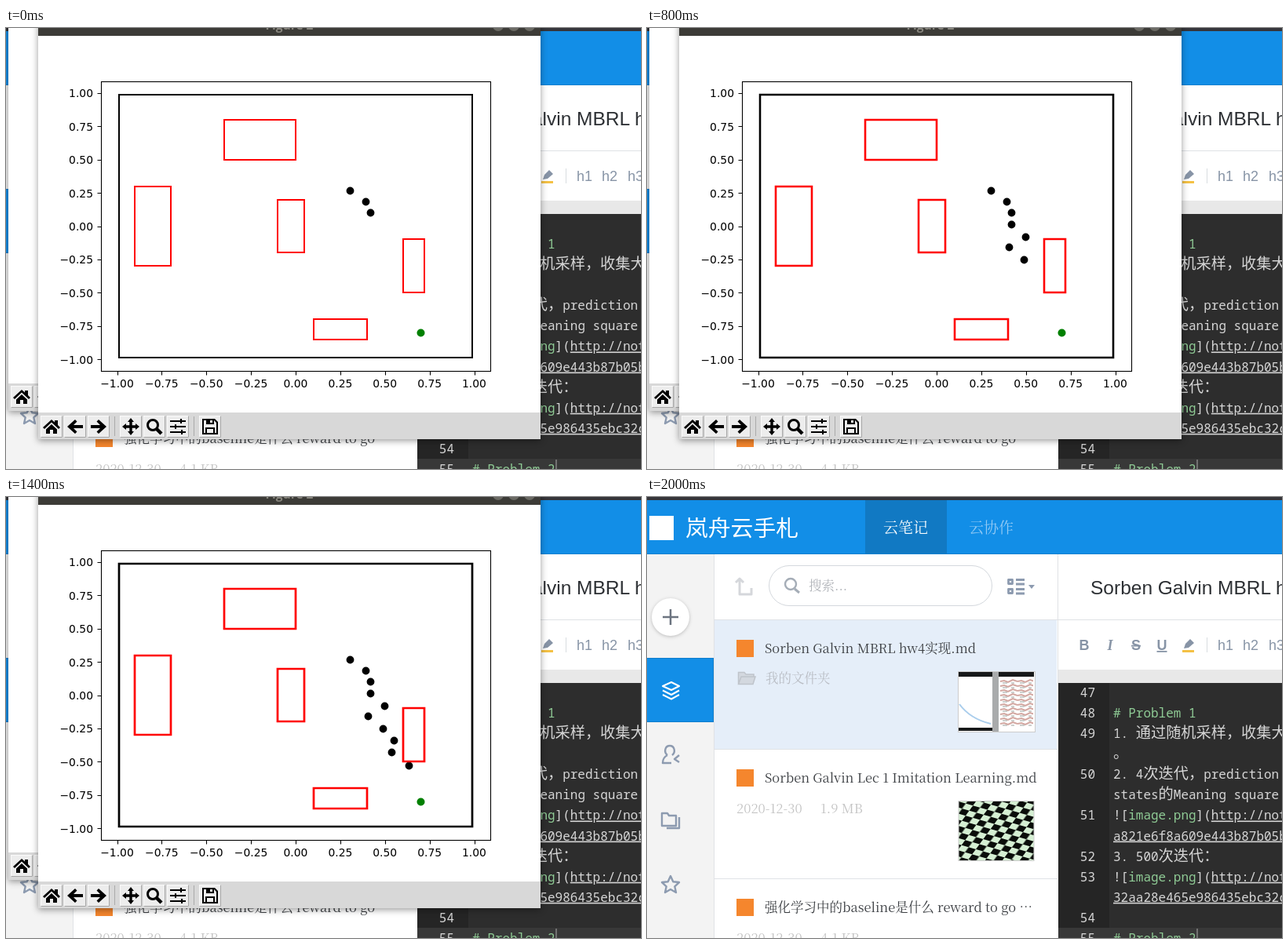
An HTML page that plays this animation: 809 px wide and 562 px high, repeating every 3 s.

```html
<!DOCTYPE html>
<html lang="zh">
<head>
<meta charset="utf-8">
<title>Planner run</title>
<style>
  html, body { margin: 0; width: 100%; height: 100%; overflow: hidden; background: #fff; }
  svg { display: block; }
  .sans { font-family: "Liberation Sans", "Noto Sans CJK SC", sans-serif; }
  .serif { font-family: "Noto Serif CJK SC", "Noto Serif", "Noto Sans CJK SC", serif; font-size: 16.5px; }
  .code { font: 16px "Noto Sans Mono", "Noto Sans CJK SC", monospace; fill: #d6d6d6; }
  .wide { font-size: 19.2px; }
  .head { fill: #8fcb95; }
  .link { text-decoration: underline; }
  .meta { fill: #c4c4c4; }
  .icon { fill: none; stroke: #8d9bb0; stroke-width: 2.4; stroke-linejoin: round; }
  .bar { font: bold 15.5px "Open Sans", sans-serif; fill: #87857d; }
  .plot text { font: 13.89px "DejaVu Sans", sans-serif; }
  .window { filter: drop-shadow(0 2px 4px rgba(0, 0, 0, .4)); }
</style>
</head>
<body>
<svg width="809" height="562" viewBox="0 0 809 562">
  <defs>
    <pattern id="checks" width="19" height="15" patternUnits="userSpaceOnUse" patternTransform="translate(397 388) rotate(16) skewX(-20)">
      <path d="M0 0h19v15H0z" fill="#d5efd3"/>
      <path d="M0 0h9.500v7.500H0zM9.500 7.500H19V15H9.500z" fill="#0a0d0a"/>
    </pattern>
    <pattern id="waves" x="450" y="232" width="22" height="6" patternUnits="userSpaceOnUse">
      <path d="M0 3l5-1 5 2 6-3 6 2" fill="none" stroke="#d3a7a1" stroke-width="2"/>
      <path d="M3 5H9M14 5H18" stroke="#9aa09c"/>
    </pattern>
    <linearGradient id="pane" x2="0" y2="1">
      <stop stop-color="#b4b6b8"/><stop offset="1" stop-color="#d6d6d6"/>
    </linearGradient>
    <path id="home" d="M-11 1L0-9 4-5.500V-8H8V-2L11 1 9 3 0-5.500-9 3zM-7 3.500L0-3 7 3.500V9H2V4H-2V9H-7z"/>
    <path id="arrow" d="M-10 0L0-9 2.500-6.500-2-2H10V2H-2L2.500 6.500 0 9z"/>
    <path id="move" d="M0-11L4-6H1.700V-1.700H6V-4L11 0 6 4V1.700H1.700V6H4L0 11-4 6H-1.700V1.700H-6V4L-11 0-6-4V-1.700H-1.700V-6H-4z"/>
    <g id="zoom"><circle cx="-2" cy="-2" r="6.500" fill="none" stroke="#000" stroke-width="3"/><path d="M3 3L9 9" stroke="#000" stroke-width="4.500"/></g>
    <path id="sliders" d="M-10-7H10M-10 0H10M-10 7H10M4-10V-4M-3-3V3M5 4V10" fill="none" stroke="#000" stroke-width="2"/>
    <path id="save" fill-rule="evenodd" d="M-10-10H6L10-6V10H-10zM-8-8V8H-6V1H6V8H8V-5L5-8V-3H-5V-8zM0-8V-5H3V-8zM-4 3V8H4V3z"/>
    <path id="star" d="M0-11L3.300-3.800 11-3 5.300 2.300 7 10 0 6-7 10-5.300 2.300-11-3-3.300-3.800z"/>
  </defs>

  <!-- note app -->
  <rect width="809" height="562" fill="#fff"/>
  <rect width="85" height="562" fill="#f3f3f3"/>
  <path d="M85.500 73V562M523.500 73V237" stroke="#e0e2e5"/>
  <rect width="809" height="4" fill="#35353a"/>
  <rect y="4" width="809" height="69" fill="#128ee7"/>
  <rect x="278" y="4" width="104" height="69" fill="#1179c3"/>
  <path d="M0 72.500H809" stroke="#1180cf"/>
  <rect x="3" y="24" width="31" height="31" fill="#fff"/>
  <text class="sans" x="49" y="50" font-size="28.800" fill="#fff">岚舟云手札</text>
  <g class="serif" style="font-size:19px" fill="#fff"><text x="301" y="46">云笔记</text><text x="410" y="46" fill="#93caf5">云协作</text></g>

  <circle cx="30" cy="153" r="24" fill="#fff" style="filter:drop-shadow(0 1px 2px #bbb)"/>
  <path d="M20 153H40M30 143V163" stroke="#6c7480" stroke-width="2.500"/>
  <rect x="-.5" y="205.500" width="85" height="81" fill="#128ee7" stroke="#107dcc"/>
  <g class="icon">
    <path d="M20 241L31 236 41 241 31 246zM20 246.500L31 252 41 246.500M20 252L31 257.500 41 252" stroke="#fff" stroke-width="2"/>
    <path d="M26 329C21 325 23 317 29 317S37 325 32 329M26 329C22 331 20 334 20 339H31M41 329L35 334 41 338"/>
    <path d="M19 403H26L28 406H37V419H19zM41 408V422H25"/>
    <use href="#star" x="30" y="494"/>
    <path d="M113 109L118 104 123 109M118 105V124H133V116" stroke="#d5d7db" stroke-width="3"/>
    <rect x="155.500" y="87.500" width="284" height="51" rx="25.500" stroke="#d4d8dd" stroke-width="1"/>
    <circle cx="183" cy="111" r="7" stroke="#a5adb7"/><path d="M188 117L194 122" stroke="#a5adb7" stroke-width="3"/>
    <path d="M460.500 105.500H465.500V110.500H460.500zM460.500 117.500H465.500V122.500H460.500zM470 105.500H481M470 111H481M470 117.500H481M470 123H481" stroke-width="2.800"/>
    <path d="M486 112H494L490 117z" fill="#8d9bb0" stroke="none"/>
  </g>
  <rect x="86" y="157" width="436" height="164" fill="#e5eef9"/>
  <path d="M86 156.500H809M86 321.500H523M86 486.500H523" stroke="#dfe2e6"/>
  <path d="M114 182h22v22h-22zM114 347h22v22h-22zM114 512h22v22h-22z" fill="#f5862d"/>
  <path d="M116.500 238V223.500H124L126 226H136V229M116.500 238.500L120 229H138L135 238.500z" fill="#d3d8df" stroke="#bfc4cb" stroke-width="1.500"/>
  <g class="serif" fill="#3b3e42">
    <text x="206" y="119" fill="#b2b5ba">搜索...</text>
    <text x="150" y="199">Sorben Galvin MBRL hw4实现.md</text>
    <text x="151" y="237" fill="#b9bdc4">我的文件夹</text>
    <text x="150" y="364">Sorben Galvin Lec 1 Imitation Learning.md</text>
    <text x="150" y="529">强化学习中的baseline是什么 reward to go ⋯</text>
    <g class="meta">
      <text x="114" y="403">2020-12-30</text><text x="221" y="403">1.9 MB</text>
      <text x="114" y="568">2020-12-30</text><text x="221" y="568">4.1 KB</text>
    </g>
  </g>
  <g>
    <rect x="396.500" y="222.500" width="98" height="77" fill="#fff" stroke="#ccc"/>
    <path d="M397 223H493V229H397zM397 294H440V298H397z" fill="#17191a"/>
    <rect x="440" y="223" width="8" height="76" fill="#a9abac"/>
    <path d="M398 264Q412 283 438 289" fill="none" stroke="#a9cdec" stroke-width="2"/>
    <rect x="450" y="232" width="42" height="60" fill="url(#waves)"/>
    <rect x="397" y="387.500" width="96" height="76" fill="url(#checks)" stroke="#ccc"/>
  </g>

  <text class="sans" x="565" y="124" font-size="24.500" fill="#2d3034">Sorben Galvin MBRL hw4</text>
  <g class="sans" font-size="18" fill="#8794a6" text-anchor="middle">
    <text x="557" y="195" font-weight="bold">B</text>
    <text x="590" y="195" font-style="italic" font-weight="bold" font-family="Liberation Serif, serif">I</text>
    <text x="623" y="195" font-weight="bold" text-decoration="line-through">S</text>
    <text x="656" y="195" font-weight="bold" text-decoration="underline">U</text>
    <text x="737" y="195">h1</text><text x="769" y="195">h2</text><text x="802" y="195">h3</text>
  </g>
  <path d="M684 193L686 187 692 181 697 186 690 192z" fill="#8794a6"/>
  <path d="M682 196.500H697" stroke="#f4c145" stroke-width="3"/>
  <path d="M713.500 179V198" stroke="#d9dce0"/>
  <rect x="524" y="220" width="285" height="17" fill="#e8e8e8"/>
  <rect x="524" y="237" width="285" height="325" fill="#2d2d2d"/>
  <rect x="524" y="237" width="65" height="325" fill="#252525"/>
  <rect x="524" y="549" width="285" height="13" fill="#383838"/>
  <g id="editor" class="code"></g>
  <path d="M701 550V562" stroke="#aaa"/>

  <!-- plot windows -->
  <g id="figures">
    <g class="window">
      <rect x="3" y="-20" width="640" height="508" fill="#fff"/>
      <rect x="3" y="453" width="60" height="35" fill="#d8d8d8"/>
      <g id="backTools"></g>
    </g>
    <g class="window">
      <rect x="41" y="-20" width="640" height="544" fill="#fff"/>
      <rect x="41" y="-20" width="640" height="30" fill="#3c3b37"/>
      <text class="bar" x="361" y="2" text-anchor="middle">Figure 2</text>
      <path d="M41 490H681V524H41z" fill="#d8d8d8"/>
      <g fill="#6b6a64"><circle cx="627" cy="-3" r="7"/><circle cx="647" cy="-3" r="7"/><circle cx="667" cy="-3" r="7"/></g>
      <g id="tools"></g>
      <path d="M138.500 495V520M239.500 495V520" stroke="#aaa"/>
    </g>
    <g class="plot">
      <rect x="121.500" y="68.500" width="496" height="369" fill="none" stroke="#000" stroke-width="1.100"/>
      <g id="axes"></g>
      <g id="dots"></g>
      <g id="walls" fill="none"></g>
      <circle cx="528.500" cy="388.500" r="5" fill="green"/>
    </g>
  </g>

  <!-- closing windows -->
  <g id="closing">
    <rect x="28" y="-10" width="590" height="475" fill="#bcbcbc" fill-opacity=".66" stroke="#000" stroke-opacity=".08" stroke-width="2"/>
    <rect x="50" y="-10" width="222" height="51" fill="url(#pane)" stroke="#000" stroke-opacity=".12" stroke-width="3"/>
    <rect x="50" y="-10" width="222" height="20" fill="#545450"/>
    <text class="bar" x="160" y="3" text-anchor="middle">Figure 2</text>
    <g fill="#777670"><circle cx="222" cy="-2" r="6"/><circle cx="240" cy="-2" r="6"/><circle cx="258" cy="-2" r="6"/></g>
  </g>
</svg>
<script>
const $ = id => document.getElementById(id);
const LOOP = 3000, CLOSE = 1900, GONE = 2000;
const px = v => 369 + 227.5 * v;
const py = v => 252.5 - 169.6 * v;

// Editor lines: [number, markup]
const head = s => `<tspan class="head">${s}</tspan>`;
const link = s => `<tspan class="link">${s}</tspan>`;
const image = '![' + head('image.png') + '](' + link('http://note');
const lines = [
  [47, ''], [48, head('# Problem 1')],
  [49, '1. 通过随机采样，收集大'], ['', '。'],
  [50, '2. 4次迭代，prediction '], ['', 'states的Meaning square '],
  [51, image], ['', link('a821e6f8a609e443b87b05b')],
  [52, '3. 500次迭代：'],
  [53, image], ['', link('32aa28e465e986435ebc32c')],
  [54, ''], [55, head('# Problem 2')]
];
const widen = s => s.replace(/[\u3000-\u9fff\uff00-\uffef]+/g, '<tspan class="wide">$&</tspan>');
$('editor').innerHTML = lines.map(([n, s], i) => {
  const y = 255 + 26.08 * i;
  return `<text x="571" y="${y}" text-anchor="end">${n}</text><text x="594" y="${y}">${widen(s)}</text>`;
}).join('');

// Plot toolbar
const button = (icon, x, y, flip = 1) => `<g transform="translate(${x} ${y})">
  <rect x="-13.5" y="-13.5" width="27" height="27" fill="#ededed" stroke="#fafafa"/>
  <path d="M-13.5 13.5H13.5V-13.5" fill="none" stroke="#a6a6a6"/>
  <use href="#${icon}" transform="scale(${flip} 1)"/></g>`;
$('backTools').innerHTML = button('home', 20, 470) + button('arrow', 50, 470);
$('tools').innerHTML = [['home', 58], ['arrow', 88], ['arrow', 118, -1], ['move', 159],
  ['zoom', 189], ['sliders', 219], ['save', 260]]
  .map(([icon, x, flip]) => button(icon, x, 508, flip)).join('');

// Axis ticks
let axes = '';
for (let v = -1; v <= 1; v += .25) {
  const label = v.toFixed(2).replace('-', '\u2212'), x = Math.round(px(v)), y = Math.round(py(v));
  axes += `<path d="M${x + .5} 437.500v5M121.500 ${y + .5}h-5" stroke="#000" stroke-width="1.1"/>
    <text x="${px(v)}" y="458" text-anchor="middle">${label}</text>
    <text x="111" y="${py(v) + 5.5}" text-anchor="end">${label}</text>`;
}
$('axes').innerHTML = axes;

// Walls and obstacles: left, top, right, bottom in data units
const boxes = [[-.99, .99, .99, -.99], [-.4, .8, 0, .5], [-.9, .3, -.7, -.3],
  [-.1, .2, .05, -.2], [.6, -.1, .72, -.5], [.1, -.7, .4, -.85]];
$('walls').innerHTML = boxes.map((box, i) => {
  const [l, t, r, b] = box.map((v, k) => Math.round(k % 2 ? py(v) : px(v)));
  return `<path d="M${l} ${t}H${r}V${b}H${l}z" stroke="${i ? 'red' : '#000'}"/>`;
}).join('');

// Visited states: x, y, time of appearance
const steps = [[438, 207, 0], [458, 221, 0], [464, 235, 0], [464, 250, 200], [482, 266, 300],
  [461, 279, 500], [480, 295, 800], [494, 310, 900], [491, 325, 1200], [513, 342, 1400],
  [502, 358, 1700], [514, 372, 1800]];
$('dots').innerHTML = steps.map(([x, y]) => `<circle cx="${x + .5}" cy="${y + .5}" r="4.9"/>`).join('');
const dots = [...$('dots').children];

const show = (el, on) => { el.style.display = on ? '' : 'none'; };

function draw() {
  const t = performance.now() % LOOP;
  const count = steps.filter(s => s[2] <= t).length;
  show($('figures'), t < CLOSE);
  show($('closing'), t >= CLOSE && t < GONE);
  dots.forEach((dot, i) => show(dot, i < count));
  // each redraw overprints the outlines, so they thicken a little
  $('walls').setAttribute('stroke-width', 3 - 3 / count);
  requestAnimationFrame(draw);
}
draw();
</script>
</body>
</html>
```
